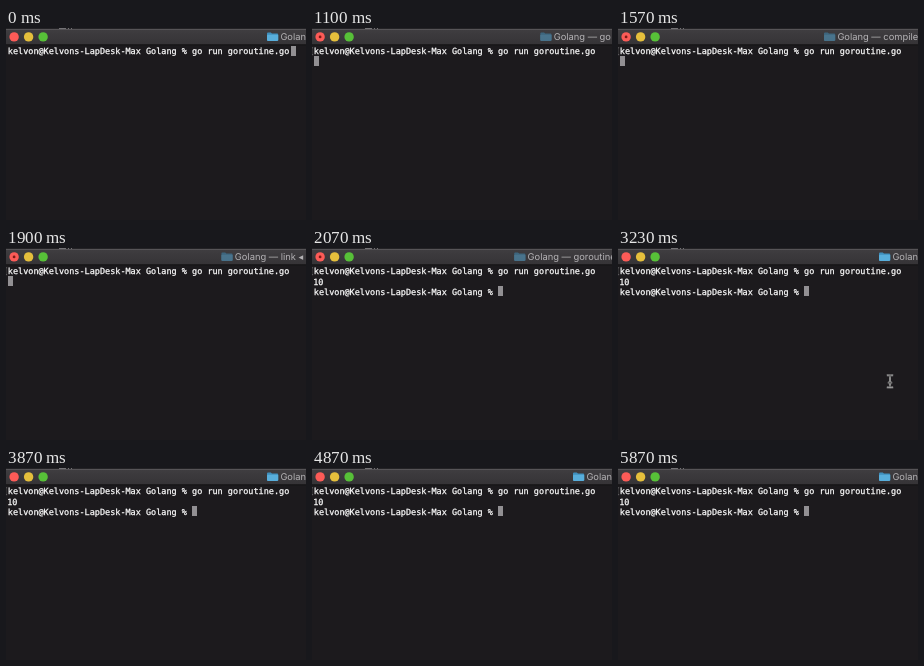
Animation of 300 by 192 pixels, one loop 6.11 s. Source, as an HTML page:

```html
<!DOCTYPE html>
<html lang="en">
<head>
<meta charset="utf-8">
<title>Terminal</title>
<style>
  html, body { margin: 0; width: 100%; height: 100%; overflow: hidden; background: #1c1a1d; }
  svg { display: block; width: 300px; height: 192px; text-rendering: geometricPrecision; }
  .shell { font: 8.5px "DejaVu Sans Mono", monospace; fill: #fff; stroke: #fff; stroke-width: .25px; white-space: pre; }
  .title text { font: 400 9.35px Inter, sans-serif; fill: #b4b2b5; white-space: pre; }
</style>
</head>
<body>
<svg viewBox="0 0 300 192">
  <defs>
    <linearGradient id="bar" x2="0" y2="1">
      <stop offset="0" stop-color="#403e41"/>
      <stop offset="1" stop-color="#353336"/>
    </linearGradient>
    <g id="folder">
      <path d="M0 1Q0 0 1 0H3.8L5 1.2H10.2Q11.2 1.2 11.2 2.2V8H0Z" fill="#3f8fbd"/>
      <rect y="2.3" width="11.2" height="6.2" rx=".8" fill="#58aedb"/>
    </g>
    <path id="beam" d="M-2.4 -6.2Q0 -6.2 0 -4.4Q0 -6.2 2.4 -6.2M0 -4.4V4.4M-2.4 6.2Q0 6.2 0 4.4Q0 6.2 2.4 6.2M-1.4 1.4H1.4"/>
  </defs>

  <rect width="300" height="192" fill="#1c1a1d"/>
  <rect width="300" height="17" fill="url(#bar)"/>
  <rect width="300" height="1" fill="#242326"/>
  <path d="M53 .5H60M62 .5H63M65 .5H66" stroke="#8a888b" stroke-width=".8"/>
  <rect y="1" width="300" height=".8" fill="#5c5a5d"/>
  <rect y="16.4" width="300" height=".8" fill="#0c0b0d"/>

  <circle cx="8.1" cy="8.9" r="4.7" fill="#fc5b57"/>
  <circle cx="22.6" cy="8.9" r="4.7" fill="#e5bf3c"/>
  <circle cx="37.1" cy="8.9" r="4.7" fill="#57c038"/>
  <circle id="busy" cx="8.1" cy="8.9" r="1.4" fill="#7d1a16"/>

  <g id="titles"></g>

  <g class="shell">
    <text id="mark" x="-2.4" y="26" stroke="none" fill="#8c8a8d">[</text>
    <text id="line1" x="1.8" y="26"></text>
    <g id="output">
      <text x="1.2" y="36.5">10</text>
      <text id="line3" x="1.8" y="47"></text>
    </g>
  </g>
  <rect id="caret" width="5" height="10" fill="#929093" shape-rendering="crispEdges"/>

  <g id="pointer" fill="none" stroke-linecap="round">
    <use href="#beam" stroke="#d8d8d8" stroke-width="1.8"/>
    <use href="#beam" stroke="#222" stroke-width=".7"/>
  </g>
</svg>
<script>
  const LOOP = 6110, START = 900, COMPILE = 1500, LINK = 1800, RUN = 2030, DONE = 2130;
  const PROMPT = 'kelvon@Kelvons-LapDesk-Max Golang % ';
  const COMMAND = 'go run goroutine.go';
  const $ = id => document.getElementById(id);

  // steps: [ms, value], each value held until the next
  function hold(el, prop, steps) {
    const frames = steps.map(([t, v]) => ({ offset: t / LOOP, [prop]: v, easing: 'step-end' }));
    frames.push({ offset: 1, [prop]: steps[steps.length - 1][1] });
    el.animate(frames, { duration: LOOP, iterations: Infinity }).startTime = 0;
  }

  const show = (el, from, to) => hold(el, 'opacity', [[0, 0], [from, 1], [to, 0]]);
  const move = (x, y) => `translate(${x}px, ${y}px)`;

  function addTitle(x, label, dim) {
    const g = document.createElementNS('http://www.w3.org/2000/svg', 'g');
    g.setAttribute('class', 'title');
    g.innerHTML = `<use href="#folder" x="${x}" y="4.4" opacity="${dim}"/>
      <text x="${x + 13.4}" y="12.3">Golang — ${label}</text>`;
    $('titles').append(g);
    return g;
  }

  $('line1').textContent = PROMPT + COMMAND;
  $('line3').textContent = PROMPT;

  hold(addTitle(261, '-zsh', 1), 'opacity', [[0, 1], [START, 0], [DONE, 1]]);
  show(addTitle(228.3, COMMAND, .5), START, COMPILE);
  show(addTitle(206, 'compile ◂ ' + COMMAND, .5), COMPILE, LINK);
  show(addTitle(215.4, 'link ◂ ' + COMMAND, .5), LINK, RUN);
  show(addTitle(202.2, 'goroutine ◂ ' + COMMAND, .5), RUN, DONE);

  show($('busy'), START, DONE);
  hold($('mark'), 'opacity', [[0, 0], [800, 1]]);
  hold($('output'), 'opacity', [[0, 0], [RUN, 1]]);
  hold($('caret'), 'transform', [[0, move(285, 18)], [800, move(2, 28)], [RUN, move(186, 38)]]);
  show($('pointer'), 3230, 3330);
  hold($('pointer'), 'transform', [[0, move(272, 133.3)], [3270, move(284, 141)], [3300, move(297, 147)]]);
</script>
</body>
</html>
```
